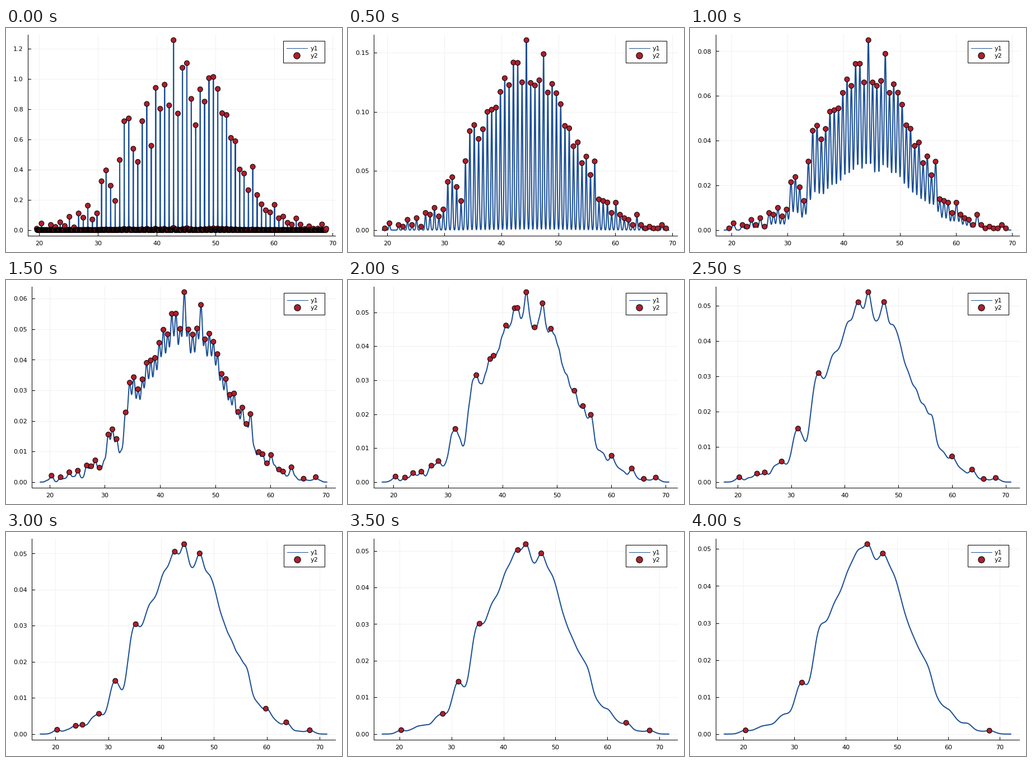
Write a matplotlib script that moves like this. It is 600 px wide and 400 px high and loops after 4.5 s.

```python
import numpy as np
import matplotlib.pyplot as plt
from matplotlib.animation import FuncAnimation
from matplotlib.patches import Rectangle

W, H, DPI = 600, 400, 100
PX = 72 / DPI
BLUE, RED = "#1c4f96", "#ac1f2d"
TOP, BOTTOM, RIGHT = 12, 371.5, 588.5
PAD = 0.03 / 1.06
N_GRID = 2048
BINS = np.arange(66)

# A bell of observations per bin; some bins stray by this many deviations.
SWINGS = {
    3: (1, 58, 64), 2.5: (19, 48), 2: (5, 14, 20), 1.5: (15, 32, 36, 53),
    1: (3, 7, 9, 46), 0.5: (11, 18, 23, 29, 38, 39, 44, 65), 0.3: (27, 30, 40),
    -0.5: (16, 25, 28, 35, 37, 41, 43, 45, 50, 57, 60),
    -1: (2, 13, 31, 33, 34, 49, 52), -1.5: (8, 12), -2.7: (17,),
}
counts = 96 * np.exp(-((BINS - 32) / 10.1) ** 2 / 2)
for size, bins in SWINGS.items():
    counts[list(bins)] += size * np.sqrt(counts[list(bins)])
counts = np.maximum(np.round(counts), 0)

# Bins lie almost evenly; their drift from even steps follows a smooth curve.
knot_k = [-17, -10, -3, 9, 20, 33, 48]
knot_drift = [-9.343, -2.93, -0.15, -1.917, -9.175, -23.288, -45.657]
drift = np.polyfit(knot_k, knot_drift, 4, w=[5, 1, 1, 1, 1, 1, 5])
k = BINS - 17
values = 19.54 + 0.024138 * (555 + 32 * k + np.polyval(drift, k))


def density(h):
    """Gaussian kernel density on a grid: linear binning, then FFT smoothing."""
    x = np.linspace(values[0] - 4 * h, values[-1] + 4 * h, N_GRID)
    dx = x[1] - x[0]
    pos = (values - x[0]) / dx
    cell = pos.astype(int)
    frac = pos - cell
    mass = counts / counts.sum() / dx
    grid = np.zeros(N_GRID)
    np.add.at(grid, cell, mass * (1 - frac))
    np.add.at(grid, cell + 1, mass * frac)
    omega = 2 * np.pi * np.arange(N_GRID // 2 + 1) / (dx * N_GRID)
    smooth = np.fft.irfft(np.fft.rfft(grid) * np.exp(-(h * omega) ** 2 / 2), N_GRID)
    return x, np.maximum(smooth, 0)


def peaks(y):
    return np.flatnonzero((y[1:-1] > y[:-2]) & (y[1:-1] > y[2:])) + 1


fig = plt.figure(figsize=(W / DPI, H / DPI), dpi=DPI, facecolor="white")
ax = fig.add_axes([0, 0, 1, 1])


def line(xs, ys, color="black", width=1.0, **kw):
    ax.plot(xs, ys, color=color, lw=width * PX, **kw)


def dots(xs, ys, size, z):
    ax.scatter(xs, ys, s=(size * PX) ** 2, c=[RED] * len(xs), edgecolors="black",
               linewidths=PX, zorder=z)


def label(x, y, text, ha):
    ax.text(x, y, text, ha=ha, va="baseline", fontsize=8, family="DejaVu Sans",
            color="black", zorder=8)


def legend(shift):
    left = 496.4 + shift
    ax.add_patch(Rectangle((left, 23.5), 569.9 - left, 39, fc="white", ec="black",
                           lw=PX, zorder=6))
    line([502.5 + shift, 539 + shift], [36.5, 36.5], BLUE, zorder=7)
    dots([520.8 + shift], [49.6], 11.4, 7)
    label(544.5, 40.8, "y1", "left")
    label(544.5, 53.3, "y2", "left")


def draw(i):
    ax.clear()
    # Half a pixel of offset makes thin lines snap to the pixel they start in.
    ax.set_xlim(0.5, W + 0.5)
    ax.set_ylim(H + 0.5, 0.5)
    ax.axis("off")

    x, y = density(0.01 + 0.1 * i)
    top = y.max()
    step, digits = {0: (0.2, 1), 1: (0.05, 2), 2: (0.02, 2)}.get(i, (0.01, 2))
    left = 39.5 if digits == 1 else 46.5
    w, h = RIGHT - left, BOTTOM - TOP

    def sx(v):
        return left + w * (PAD + (1 - 2 * PAD) * (v - x[0]) / (x[-1] - x[0]))

    def sy(v):
        return BOTTOM - h * (PAD + (1 - 2 * PAD) * v / top)

    for v in range(20, 71, 10):
        p = sx(v)
        line([p, p], [TOP, BOTTOM], "#f0f0f0", zorder=1)
        line([p, p], [BOTTOM, BOTTOM - 5], zorder=2)
        label(p, 388, str(v), "center")
    for n in range(int(1.03 * top / step) + 1):
        p = sy(n * step)
        line([left, RIGHT], [p, p], "#f0f0f0", zorder=1)
        line([left, left + 5], [p, p], zorder=2)
        label(left - 8.5, p + 4.1, f"{n * step:.{digits}f}", "right")
    line([left, left], [TOP, BOTTOM], zorder=2)
    line([left, RIGHT], [BOTTOM, BOTTOM], zorder=2)

    line(sx(x), sy(y), BLUE, 2, solid_joinstyle="round", zorder=3)
    tips = peaks(y)
    dots(sx(x[tips]), sy(y[tips]), 9, 4)
    legend(-1 if digits == 1 else 0)
    return []


anim = FuncAnimation(fig, draw, frames=9, interval=500, init_func=lambda: draw(0),
                     repeat=True, repeat_delay=0, blit=False)
plt.show()
```
